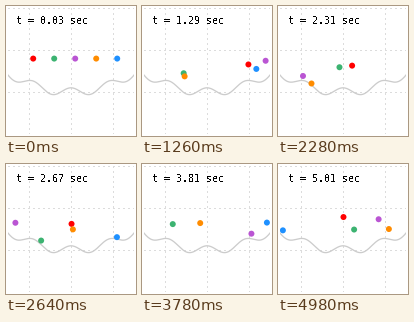
Write a matplotlib script that moves like this. It is 130 by 130 pixels and loops after 5.01 s.

```python
import numpy as np
import matplotlib.pyplot as plt
from matplotlib.animation import FuncAnimation
from matplotlib.patches import Circle

SIZE, DPI = 130, 100
PT = 72 / DPI              # one pixel in points
UNIT, EDGE = 42, 2         # pixels per metre, margin around the plot
HALF = (SIZE - 1 - 2 * EDGE + 1) / (2 * UNIT)
FRAMES, TICK, SUB = 167, 0.03, 30
DT, G = TICK / SUB, 9.8
DROP = 0.8
COLORS = ["red", "mediumseagreen", "mediumorchid", "darkorange", "dodgerblue"]


def hill(x):
    return 0.2 * x * x + 0.1 * np.cos(7 * x)


def slope(x):
    return 0.4 * x - 0.7 * np.sin(7 * x)


def fall(p, v, t):
    """Free flight for time t."""
    return (np.array([p[0] + v[0] * t, p[1] + v[1] * t - G / 2 * t * t]),
            np.array([v[0], v[1] - G * t]))


def bounce(p, v):
    """One step that contains an elastic hit on the hill."""
    s = DT
    for _ in range(8):
        q, w = fall(p, v, s)
        gap, rate = q[1] - hill(q[0]), w[1] - slope(q[0]) * w[0]
        s = min(max(s - gap / rate, 0), DT)
    q, w = fall(p, v, s)
    n = np.array([-slope(q[0]), 1])
    n /= np.hypot(*n)
    w -= 2 * min(w @ n, 0) * n
    return fall(q, w, DT - s)


def fly(x):
    """Positions of one ball after every tick."""
    p, v = np.array([x, DROP]), np.zeros(2)
    path = []
    for _ in range(FRAMES):
        for _ in range(SUB):
            q, w = fall(p, v, DT)
            if q[1] < hill(q[0]):
                q, w = bounce(p, v)
            p, v = q, w
        path.append(p)
    return path


tracks = [fly(0.5 * i - 0.9) for i in range(len(COLORS))]

fig = plt.figure(figsize=(SIZE / DPI, SIZE / DPI), dpi=DPI, facecolor="white")
inner = 2 * HALF * UNIT / SIZE
ax = fig.add_axes([EDGE / SIZE, 1 - EDGE / SIZE - inner, inner, inner])
ax.set(xlim=(-HALF, HALF), ylim=(0.5 - HALF, 0.5 + HALF))
ax.axis("off")

grid = dict(color="#dcdcdc", lw=PT, ls=(0, (2, 3)), antialiased=False, zorder=1)
for i in range(-1, 3):
    ax.axhline(i, **grid)
    if i < 2:
        ax.axvline(i, **grid)

xs = np.linspace(-1.6, 1.6, 400)
ax.plot(xs, hill(xs), color="#cccccc", lw=1.3 * PT, zorder=2)

balls = [ax.add_patch(Circle((0, 0), 3 / UNIT, color=c, lw=0, zorder=3 + i))
         for i, c in enumerate(COLORS)]
clock = fig.text(10 / SIZE, 1 - 18 / SIZE, "", family="DejaVu Sans Mono",
                 size=10 * PT, color="black", va="baseline", antialiased=False)


def draw(k):
    for ball, track in zip(balls, tracks):
        ball.center = track[k]
    clock.set_text(f"t = {(k + 1) * TICK:.2f} sec")
    return [*balls, clock]


anim = FuncAnimation(fig, draw, frames=FRAMES, interval=30, repeat=True,
                     repeat_delay=0, cache_frame_data=False)
plt.show()
```
